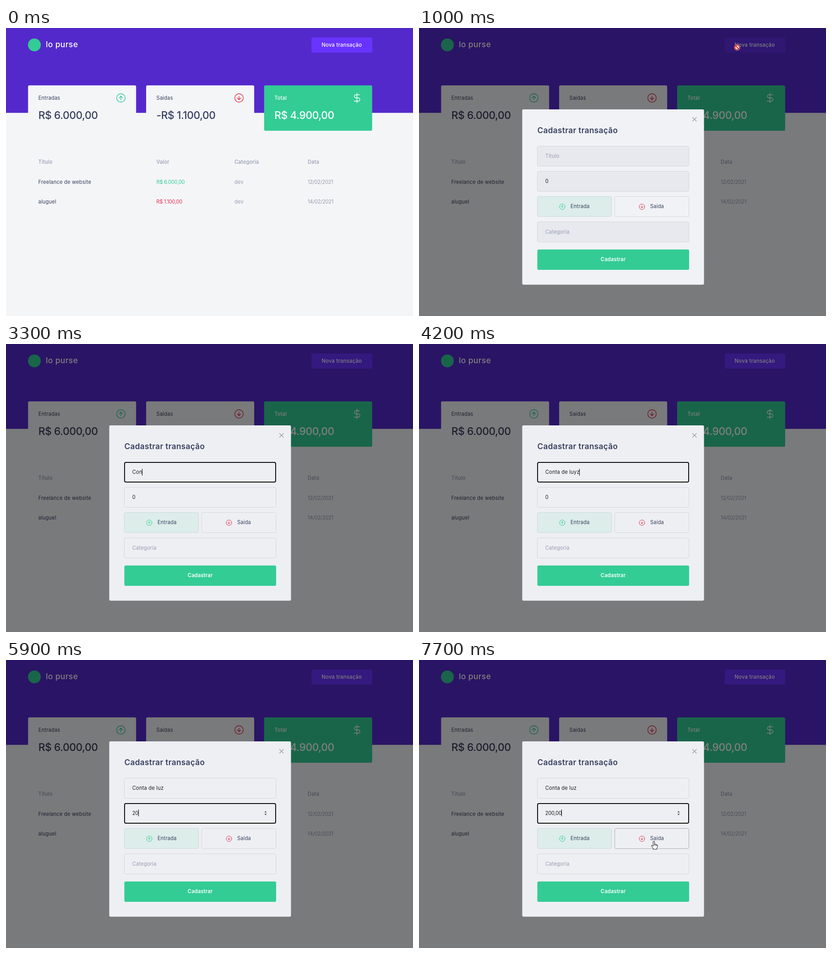
Write an HTML page with a canvas that moves like this. It is 889 px wide and 630 px high and loops after 8 s.

```html
<!DOCTYPE html>
<html lang="pt-BR">
<head>
<meta charset="utf-8">
<title>Transações</title>
<style>
html, body { margin: 0; width: 100%; height: 100%; overflow: hidden; background: #f4f5f7; }
canvas { display: block; }
</style>
</head>
<body>
<canvas id="stage" width="889" height="630"></canvas>
<script>
const ctx = document.getElementById('stage').getContext('2d');
const LOOP = 8000, STEP = 100, REM = 11.05;
const GREEN = '#33cc95', RED = '#e52e4d', INK = '#363f5f', MUTED = '#969cb3', PAGE = '#f4f5f7';
const FIELD = { x: 258.5, w: 331, h: 44 };

// [time, text]: each entry holds until the next one
const titleKeys = [
  [0, ''], [3100, 'C'], [3200, 'Co'], [3300, 'Con'], [3400, 'Cont'], [3500, 'Conta'],
  [3600, 'Conta '], [3700, 'Conta d'], [3800, 'Conta de'], [3900, 'Conta de l'],
  [4000, 'Conta de lu'], [4200, 'Conta de luyz'], [4500, 'Conta de luy'],
  [4600, 'Conta de lu'], [4700, 'Conta de luz']
];
const valueKeys = [
  [0, '0'], [5500, '2'], [5900, '20'], [6000, '200'], [6400, '200,'], [6600, '200,0'], [6700, '200,00']
];
// [time, x, y] of the pointer tip
const paths = [
  [[100, 111, 365], [300, 290, 262], [500, 560, 105], [650, 690, 24], [700, 715, 18], [900, 696, 42]],
  [[1100, 765, 33], [1300, 640, 140], [1600, 131, 491]],
  [[7100, 470, 406], [7300, 503, 402], [7500, 513, 396], [8000, 513, 396]]
];

const held = (keys, t) => keys.filter(k => k[0] <= t).pop()[1];

function along(path, t) {
  if (t < path[0][0] || t > path[path.length - 1][0]) return null;
  const i = Math.max(1, path.findIndex(k => k[0] >= t));
  const [t0, x0, y0] = path[i - 1], [t1, x1, y1] = path[i];
  const p = (t - t0) / (t1 - t0);
  return [Math.round(x0 + (x1 - x0) * p), Math.round(y0 + (y1 - y0) * p)];
}

function box(x, y, w, h, r, fill, line, width = 1) {
  ctx.beginPath();
  ctx.roundRect(x, y, w, h, r);
  if (fill) { ctx.fillStyle = fill; ctx.fill(); }
  if (line) { ctx.strokeStyle = line; ctx.lineWidth = width; ctx.stroke(); }
}

function setFont(str, size, weight) {
  ctx.font = `${weight} ${size}px Inter, "Open Sans", sans-serif`;
  const numeric = /^[-R$\d.,/ ]+$/.test(str);
  ctx.letterSpacing = size * (numeric ? -0.02 : 0.02) + 'px';
}

function text(str, x, y, color, size = REM, weight = 400, align = 'left') {
  setFont(str, size, weight);
  ctx.textAlign = align;
  ctx.fillStyle = color;
  ctx.fillText(str, x, y);
}

function textWidth(str) {
  setFont(str, REM, 400);
  return ctx.measureText(str).width;
}

function stroke(d, color, width) {
  ctx.strokeStyle = color;
  ctx.lineWidth = width;
  ctx.lineCap = ctx.lineJoin = 'round';
  ctx.stroke(new Path2D(d));
}

// dir is -1 for up and 1 for down
function arrowIcon(x, y, r, dir, color) {
  ctx.save();
  ctx.translate(x, y);
  ctx.scale(1, dir);
  const a = r * 0.42;
  stroke(`M${r} 0A${r} ${r} 0 1 1 ${-r} 0A${r} ${r} 0 1 1 ${r} 0M0 ${-a}V${a}M${-a} 0L0 ${a}L${a} 0`,
    color, r > 8 ? 1.4 : 1);
  ctx.restore();
}

function dollarIcon(x, y) {
  ctx.save();
  ctx.translate(x - 11.5, y - 12);
  stroke('M11.5 1.5v21M17 5H9.5a3.5 3.5 0 0 0 0 7h5a3.5 3.5 0 0 1 0 7H5.5', '#fff', 1.4);
  ctx.restore();
}

function card(x, label, amount, total) {
  box(x, 125.5, 236, 99.2, 3, total ? GREEN : PAGE);
  const color = total ? '#fff' : INK;
  text(label, x + 22.5, 156.5, color, REM, total ? 500 : 400);
  text(amount, x + 22.5, 199, color, 22.8, 500);
}

function row(y, title, value, category, date, color) {
  text(title, 70.5, y, INK);
  text(value, 328.5, y, color);
  text(category, 499, y, MUTED);
  text(date, 659, y, MUTED);
}

function drawPage(hover) {
  ctx.fillStyle = PAGE;
  ctx.fillRect(0, 0, 889, 630);
  ctx.fillStyle = '#5429cc';
  ctx.fillRect(0, 0, 889, 185.6);

  box(48, 23, 28, 28, 14, GREEN);
  text('lo purse', 87, 42, '#fff', 17.5, 500);
  box(667.3, 20.7, 132.7, 33, 3, hover ? '#5f2ee6' : '#6933ff');
  text('Nova transação', 733.25, 40.5, '#fff', 11.3, 500, 'center');

  card(48.2, 'Entradas', 'R$ 6.000,00');
  arrowIcon(251, 153, 9.3, -1, GREEN);
  card(306.1, 'Saidas', '-R$ 1.100,00');
  arrowIcon(509, 153, 9.3, 1, RED);
  card(563.8, 'Total', 'R$ 4.900,00', true);
  dollarIcon(766.5, 153);

  [['Título', 70.5], ['Valor', 328.5], ['Categoria', 499], ['Data', 659]]
    .forEach(([label, x]) => text(label, x, 297, MUTED, REM, 500));
  row(340.5, 'Freelance de website', 'R$ 6.000,00', 'dev', '12/02/2021', GREEN);
  row(384, 'aluguel', 'R$ 1.100,00', 'dev', '14/02/2021', RED);
}

function field(y, str, fill, focused, placeholder) {
  box(FIELD.x, y, FIELD.w, FIELD.h, 3, fill, '#d5d7dc');
  if (focused) box(FIELD.x + 0.5, y + 0.5, FIELD.w - 1, FIELD.h - 1, 3, null, '#101010', 2);
  text(str || placeholder, 275.8, y + 25.5, str ? '#1c1c20' : MUTED);
}

function caret(str, y) {
  ctx.fillStyle = '#000';
  ctx.fillRect(276 + Math.floor(str ? textWidth(str) : 0), y, 1, 15);
}

function spinner() {
  ctx.fillStyle = '#444';
  ctx.fill(new Path2D('M564.5 333.5h5l-2.5-3zM564.5 336.5h5l-2.5 3z'));
}

function drawModal(t) {
  const fresh = t < 1100;
  const bg = fresh ? '#f0f2f5' : '#eeeff3';
  const inputBg = fresh ? '#e7e9ee' : bg;
  const title = held(titleKeys, t), value = held(valueKeys, t);
  const onTitle = t >= 1900 && t < 5100, onValue = t >= 5100;

  ctx.fillStyle = 'rgba(0,0,0,.5)';
  ctx.fillRect(0, 0, 889, 630);
  box(225.5, 178, 397, 383.5, 3, bg);
  stroke('M597.5 195.5l8.5 8.5M606 195.5l-8.5 8.5', '#989ba5', 1.3);
  text('Cadastrar transação', 258.5, 229.5, INK, 17.2, 600);

  field(258.5, title, inputBg, onTitle, 'Título');
  field(313.5, value, inputBg, onValue);
  box(258.5, 368.5, 162, 44, 3, '#dcedea', '#d0d9da');
  arrowIcon(313, 391, 6, -1, GREEN);
  text('Entrada', 331, 394, INK);
  box(427.5, 368.5, 162, 44, 3, bg, t >= 7200 ? '#aaacb1' : '#d5d7dc');
  arrowIcon(487, 391, 6, 1, RED);
  text('Saída', 505, 394, INK);
  field(424, '', inputBg, false, 'Categoria');
  box(258.5, 484.5, 331.5, 44.5, 3, GREEN);
  text('Cadastrar', 424.2, 510, '#fff', REM, 600, 'center');

  if (onTitle && (t < 2300 || t >= 2800)) caret(title, 273);
  if (onValue) {
    spinner();
    if (t < 5500) {
      ctx.fillStyle = '#1a73d9';
      ctx.fillRect(276, 327, 7, 16);
      text(value, 275.8, 339, '#fff');
    } else if (t < 7200 || t >= 7700) caret(value, 327);
  }
}

const pointers = {
  arrow: 'M0 0V16L3.7 12.5L6.2 18.3L8.6 17.2L6.1 11.6H11.4Z',
  hand: 'M-1.5 1Q0 -.5 1.5 1V7L4 7.3L6.5 8L8 9.3V13L6.5 15.5V18H-1.5V16L-5.5 10.5Q-5.5 8.5 -3.5 9.5L-1.5 11Z'
};

function drawPointer(kind, x, y) {
  ctx.save();
  ctx.translate(x, y);
  ctx.fillStyle = '#fff';
  ctx.fill(new Path2D(pointers[kind]));
  stroke(pointers[kind], '#111', 1);
  if (kind === 'hand') stroke('M1.5 7V10M4 7.5V10.2M6.2 8.4V10.6', '#111', 0.8);
  ctx.restore();
}

function drawBlocked(x, y) {
  box(x - 6.5, y - 6.5, 13, 13, 6.5, '#fff');
  box(x - 5, y - 5, 10, 10, 5, '#fff', '#d01c1c', 2);
  stroke(`M${x - 3.5} ${y - 3.5}l7 7`, '#d01c1c', 2);
}

function draw(t) {
  drawPage(t >= 600 && t < 1100);
  if (t >= 1000) drawModal(t);
  if (t >= 1000 && t < 1100) drawBlocked(695, 42.5);
  const hand = (t >= 700 && t < 1000) || t >= 7200;
  for (const path of paths) {
    const at = along(path, t);
    if (at) drawPointer(hand ? 'hand' : 'arrow', ...at);
  }
}

function tick() {
  const t = performance.now() % LOOP;
  draw(Math.floor(t / STEP) * STEP);
  requestAnimationFrame(tick);
}
tick();
</script>
</body>
</html>
```
